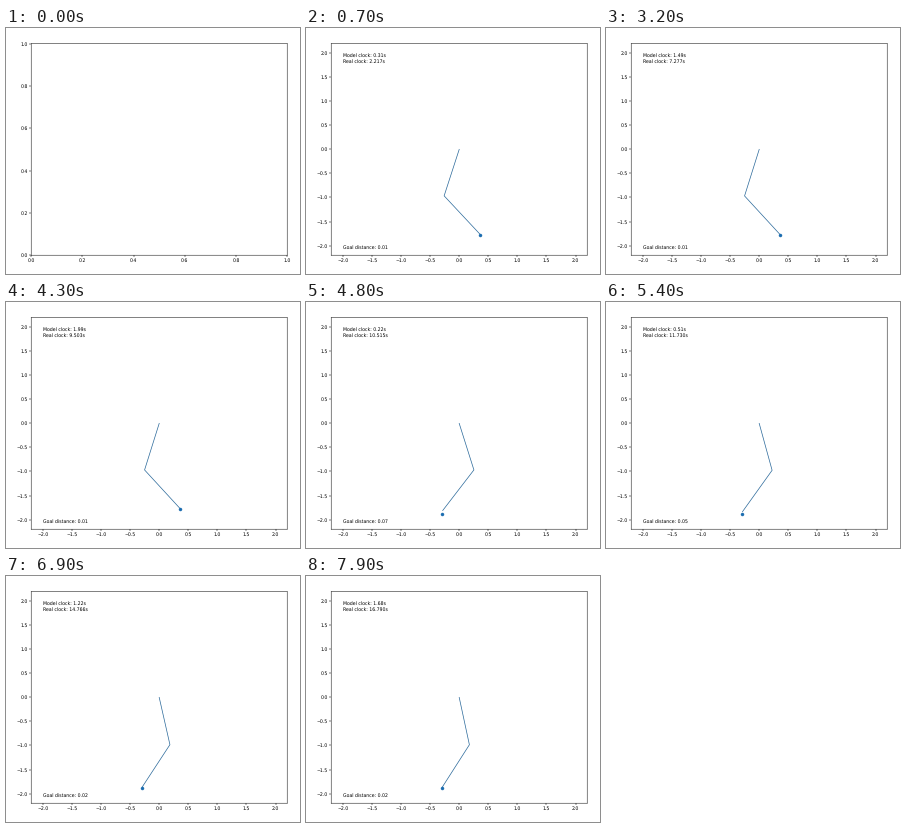
A matplotlib script for the animation above (8000 ms loop, 294x246 px).

```python
import numpy as np
import matplotlib.pyplot as plt
from matplotlib.animation import FuncAnimation

DPI = 32
W, H = 294, 246
FRAMES = 80
SWITCH = 44  # second run starts here
ARM_COLOR, DOT_COLOR = "#2c6a9b", "#1a6cb0"

plt.rcParams.update({
    "font.family": "DejaVu Sans",
    "font.size": 10.3,
    "text.hinting": "none",
    "axes.linewidth": 1.1,
    "xtick.major.width": 1.1,
    "ytick.major.width": 1.1,
})

fig = plt.figure(figsize=(W / DPI, H / DPI), dpi=DPI, facecolor="white")
ax = fig.add_axes([25.2 / W, 1 - 227.2 / H, 256 / W, 211.6 / H])
for spine in ax.spines.values():
    spine.set_snap(False)

arm, = ax.plot([], [], color=ARM_COLOR, lw=1.6, zorder=2)
goal_dot, = ax.plot([], [], "o", color=DOT_COLOR, ms=6.8, zorder=3)
clocks = ax.text(-2, 2, "", va="top")
distance = ax.text(-2, -2, "", va="top")
artists = (arm, goal_dot, clocks, distance)


def set_view(low, high, ticks):
    ax.set(xlim=(low, high), ylim=(low, high), xticks=ticks, yticks=ticks)


def settle(n, rest, swing, tau):
    return rest + swing * np.exp(-n / tau)


def state(i):
    """Goal, remaining distance, elbow side and steps into the run."""
    if i < SWITCH:
        return (0.355, -1.77), settle(i, 0.006, 0.017, 8), -1, i - 0.6
    n = i - SWITCH
    return (-0.295, -1.885), settle(n, 0.012, 0.087, 12), 1, n + 0.6


def arm_points(goal, gap, side):
    """Two unit links reaching towards the goal, angles from straight down."""
    reach = np.hypot(*goal) - gap
    heading = np.arctan2(goal[0], -goal[1])
    bend = heading + side * np.arccos(reach / 2)
    xs = [0, np.sin(bend), reach * np.sin(heading)]
    ys = [0, -np.cos(bend), -reach * np.cos(heading)]
    return xs, ys


def draw(i):
    for a in artists:
        a.set_visible(i > 0)
    if i == 0:
        set_view(0, 1, np.linspace(0, 1, 6))
        return artists
    set_view(-2.2, 2.2, np.linspace(-2, 2, 9))
    goal, gap, side, steps = state(i)
    model = 0.0488 * steps - 0.000042 * steps ** 2
    real = 0.8 + 0.2024 * i
    arm.set_data(*arm_points(goal, gap, side))
    goal_dot.set_data([goal[0]], [goal[1]])
    clocks.set_text(f"Model clock: {model:.2f}s\nReal clock: {real:.3f}s")
    distance.set_text(f"Goal distance: {gap:.2f}")
    return artists


anim = FuncAnimation(fig, draw, frames=FRAMES, interval=100,
                     repeat=True, repeat_delay=0, blit=False)
plt.show()
```
